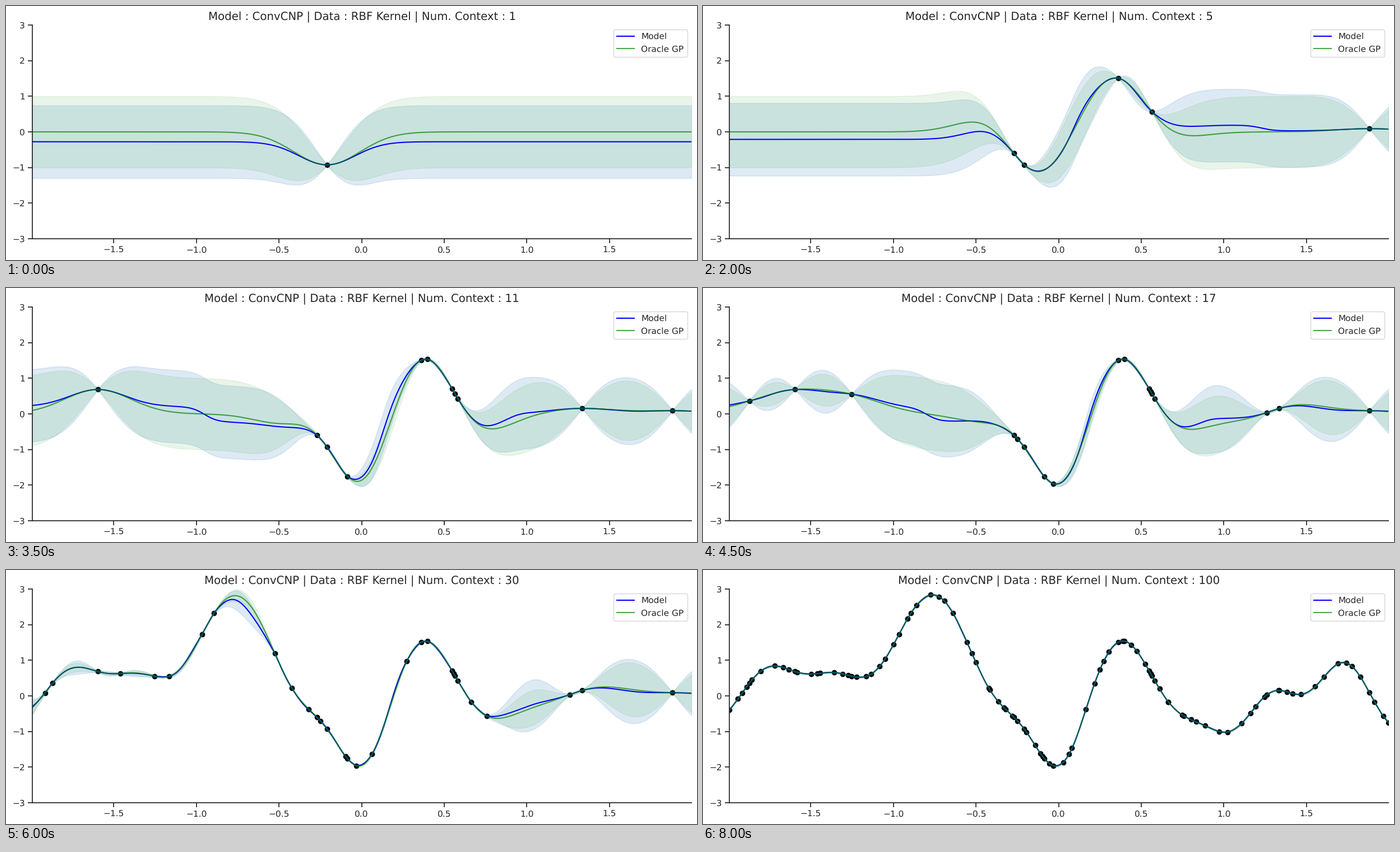
A matplotlib script for the animation above (8.5 s loop, 1233 by 454 pixels).

```python
import numpy as np
import matplotlib.pyplot as plt
from matplotlib.animation import FuncAnimation

W, H, DPI = 1233, 454, 100
LEFT, RIGHT, TOP, BOTTOM = 46.8, 1223.4, 34, 416
X_MIN, X_MAX = -1.993, 1.997
INK = "#262626"

COUNTS = [1, 2, 3, 4, 5, 7, 9, 11, 14, 17, 20, 25, 30, 40, 50, 75, 100]

# Heights of the sampled function at evenly spaced knots
KNOT_Y = np.array([
    -0.40, 0.60, 0.79, 0.615, 0.64, 0.55, 1.47, 2.70, 2.50, 0.90, -0.33,
    -1.225, -1.96, -0.34, 1.42, 1.08, -0.19, -0.73, -1.02, -0.455, 0.155,
    0.08, 0.825, 0.50, -0.75])
KNOT_X = np.linspace(X_MIN, X_MAX, len(KNOT_Y))

# First context points in order of arrival; later ones fill the axis evenly
FIRST_X = [
    -0.209, 0.361, -0.270, 0.565, 1.881, 0.399, 1.335, -1.596, 0.548, -0.087,
    0.582, -1.871, -0.249, 1.260, -1.253, -0.032, 0.558, -1.915, -1.165, 0.063,
    -1.460, -0.965, -0.894, -0.097, 0.273, -0.524, -0.422, -0.321, 0.663, 0.758,
    X_MIN, X_MAX]


def rbf(a, b, scale):
    return np.exp(-((a[:, None] - b[None, :]) ** 2) / (2 * scale ** 2))


def gp_posterior(xc, yc, x, scale=0.2, noise=0.002):
    cov = rbf(xc, xc, scale) + noise * np.eye(len(xc))
    cross = rbf(xc, x, scale)
    mean = cross.T @ np.linalg.solve(cov, yc)
    var = 1 - np.sum(cross * np.linalg.solve(cov, cross), axis=0)
    return mean, np.sqrt(np.maximum(var, 0))


def nearby_level(xc, yc, x, reach=0.08):
    """Average of the context values, dominated by the nearest ones."""
    weights = np.exp(-np.abs(x[:, None] - xc[None, :]) / reach)
    return weights @ yc / weights.sum(axis=1)


def model_prediction(xc, yc, x):
    """Like the oracle, but with a shorter memory and a pull to nearby data."""
    pull = 0.3
    residual = yc - pull * nearby_level(xc, yc, xc)
    mean, std = gp_posterior(xc, residual, x, scale=0.17, noise=0.001)
    return mean + pull * nearby_level(xc, yc, x), 1.02 * std


golden = (1 + 5 ** 0.5) / 2
later = np.arange(1, COUNTS[-1] - len(FIRST_X) + 1) * golden % 1
context_x = np.concatenate([FIRST_X, X_MIN + (X_MAX - X_MIN) * later])
context_y, _ = gp_posterior(KNOT_X, KNOT_Y, context_x, noise=1e-5)
grid = np.linspace(X_MIN, X_MAX, 600)

plt.rcParams.update({
    "font.family": "DejaVu Sans", "font.size": 11.1, "text.hinting": "none",
    "text.color": INK, "axes.edgecolor": INK, "axes.linewidth": 1.25,
    "xtick.color": INK, "ytick.color": INK})

fig = plt.figure(figsize=(W / DPI, H / DPI), dpi=DPI, facecolor="white")
ax = fig.add_axes([LEFT / W, 1 - BOTTOM / H, (RIGHT - LEFT) / W, (BOTTOM - TOP) / H])
ax.set_xlim(X_MIN, X_MAX)
ax.set_ylim(-3, 3)
ax.set_xticks(np.arange(-1.5, 1.6, 0.5))
ax.set_yticks(range(-3, 4))
ax.tick_params(length=6, width=1.25, pad=3.5)
ax.spines[["top", "right"]].set_visible(False)

title = ax.set_title("", fontsize=14.2, pad=6)
dots = ax.scatter([], [], color="black", zorder=1)
model_line, = ax.plot([], [], color="blue", lw=1.5, label="Model")
oracle_line, = ax.plot([], [], color="green", alpha=0.7, lw=1.5, label="Oracle GP")
ax.legend(loc="upper right")
bands = []


def draw_curve(line, mean, std, color, alpha, zorder):
    line.set_data(grid, mean)
    bands.append(ax.fill_between(grid, mean - std, mean + std, color=color,
                                 alpha=alpha, lw=1, zorder=zorder))


def update(step):
    while bands:
        bands.pop().remove()
    count = COUNTS[step]
    xc, yc = context_x[:count], context_y[:count]
    dots.set_offsets(np.column_stack([xc, yc]))
    draw_curve(model_line, *model_prediction(xc, yc, grid), "tab:blue", 0.15, 1.1)
    draw_curve(oracle_line, *gp_posterior(xc, yc, grid), "tab:green", 0.1, 1.2)
    title.set_text(f"Model : ConvCNP | Data : RBF Kernel | Num. Context : {count}")
    return [dots, model_line, oracle_line, title, *bands]


animation = FuncAnimation(fig, update, frames=len(COUNTS), interval=500,
                          init_func=lambda: [], repeat=True, repeat_delay=0)
plt.show()
```
